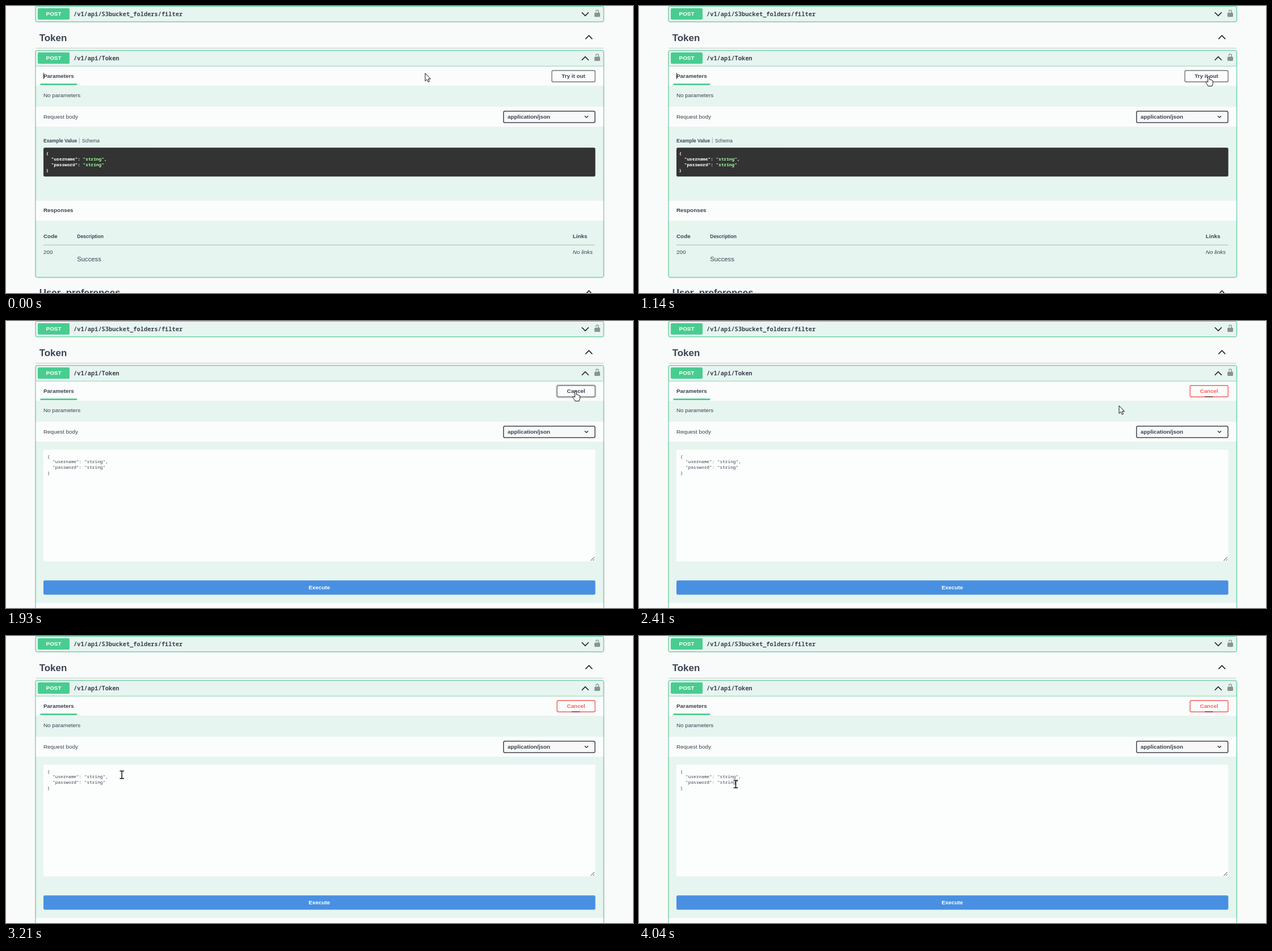
Recreate the animation shown at these times as an HTML page. Size 1105x507 px, loop 4100 ms.

```html
<!DOCTYPE html>
<html lang="en">
<head>
<meta charset="utf-8">
<title>API console</title>
<style>
html, body { margin: 0; height: 100%; overflow: hidden; background: #f9fbfa }
svg { display: block }
text { font: 9.87px "Liberation Sans", Arial, sans-serif; fill: #3b4151; white-space: pre }
.b { font-weight: 700 }
.m { text-anchor: middle }
.w { fill: #fff }
.h { font-size: 16.92px }
.s { font-size: 8.46px }
.path { font: 600 10.33px "Noto Sans Mono", monospace }
.code { font: 7.75px "Noto Sans Mono", monospace }
.dark text { font-weight: 700; fill: #fff }
.dark tspan { fill: #a2fca2 }
.post { fill: #49cc90 }
.box { fill: #e7f5f0; stroke: #49cc90; filter: drop-shadow(0 0 1px #0003) }
.bar { fill: #fbfdfc; filter: drop-shadow(0 .7px .7px #0002) }
.chev { fill: none; stroke: #222; stroke-width: 1.6 }
.btn { fill: #fbfdfc; stroke-width: 1.4 }
</style>
</head>
<body>
<svg width="1105" height="507" viewBox="0 0 1105 507">
  <defs>
    <g id="lock" fill="#8b9391">
      <rect x="-5" y="-1.5" width="10" height="7.6" rx="1.5"/>
      <path d="M-2.2-3V-3.5C-2.2-7 2.2-7 2.2-3.5V-1" fill="none" stroke="#8b9391" stroke-width="1.4"/>
    </g>
    <path id="up" class="chev" d="M-6 3.2L0-3L6 3.2"/>
  </defs>

  <rect class="box" x="52.2" y=".5" width="1001" height="27.3" rx="2.5"/>
  <rect class="post" x="56" y="4" width="56" height="20" rx="2"/>
  <text class="b m w" x="84" y="17.3">POST</text>
  <text class="path" x="119" y="18">/v1/api/S3bucket_folders/filter</text>
  <use href="#up" transform="translate(1020.8 14.4) scale(1 -1)"/>
  <use href="#lock" x="1042" y="13.2"/>

  <text class="b h" x="58.7" y="62.2">Token</text>
  <use href="#up" x="1027.3" y="55.2"/>
  <path d="M52 74.4H1053" stroke="#c3c9c9"/>

  <rect id="block" class="box" x="52.2" y="78.7" width="1001" rx="2.5"/>
  <rect class="post" x="56" y="82" width="56" height="20" rx="2"/>
  <text class="b m w" x="84" y="95.3">POST</text>
  <text class="path" x="119" y="96">/v1/api/Token</text>
  <use href="#up" x="1020.8" y="92.6"/>
  <use href="#lock" x="1042" y="91"/>

  <rect class="bar" x="52.7" y="106.5" width="1000" height="35"/>
  <path d="M52.7 106.2H1052.7" stroke="#8bdcb8"/>
  <rect class="post" x="60.5" y="137" width="64.8" height="2.8"/>
  <text class="b" x="66" y="127">Parameters</text>
  <path id="caret" d="M66.5 118V129" stroke="#222"/>
  <text x="66" y="161">No parameters</text>
  <rect class="bar" x="52.7" y="178" width="1000" height="35"/>
  <text x="66" y="198.6">Request body</text>
  <rect x="876.8" y="185.8" width="161.2" height="20.2" rx="2.6" fill="#f7f8f8" stroke="#41444e" stroke-width="1.5"/>
  <text class="b" x="884" y="198.6">application/json</text>
  <path class="chev" d="M1020 194.2L1023 197.2L1026 194.2" style="stroke-width:1.3"/>

  <g id="view">
    <text class="b s" x="66" y="240.5">Example Value</text>
    <path d="M129.3 232.5V242.5" stroke="#a5adab"/>
    <text class="s" x="134" y="240.5">Schema</text>
    <rect x="66" y="250.2" width="972.6" height="51" rx="2.8" fill="#333"/>
    <g class="dark">
      <text class="code" x="70.5" y="262.6">{</text>
      <text class="code" x="70.5" y="272.6">  "username": <tspan>"string"</tspan>,</text>
      <text class="code" x="70.5" y="282.6">  "password": <tspan>"string"</tspan></text>
      <text class="code" x="70.5" y="292.6">}</text>
    </g>
    <rect class="bar" x="52.7" y="344" width="1000" height="35"/>
    <text class="b" x="66" y="364.2">Responses</text>
    <text class="b" x="66" y="410">Code</text>
    <text class="b s" x="125.3" y="410">Description</text>
    <text class="b" x="998.8" y="410">Links</text>
    <path d="M66 422.2H1038" stroke="#a9b5b3"/>
    <text x="66" y="438.4">200</text>
    <text x="125.3" y="450.8" style="font-size:11.28px">Success</text>
    <text x="998.8" y="438.4" font-style="italic" style="font-style:italic">No links</text>
    <text class="b h" x="58.7" y="511.8">User_preferences</text>
    <use href="#up" x="1027.3" y="506"/>
  </g>

  <g id="edit">
    <rect x="66" y="227.3" width="972.6" height="197.5" rx="2.5" fill="#fcfefd"/>
    <text class="code" x="72.8" y="241.8">{</text>
    <text class="code" x="72.8" y="251.4">  "username": "string",</text>
    <text class="code" x="72.8" y="261.1">  "password": "string"</text>
    <text class="code" x="72.8" y="270.8">}</text>
    <path d="M1030.5 423.5L1037 417M1034.5 423.5L1037 421" stroke="#444"/>
    <rect x="66" y="458.2" width="972.6" height="25.3" rx="2.5" fill="#4990e2"/>
    <text class="b m w" x="552.2" y="474.2">Execute</text>
    <rect class="bar" x="52.7" y="498" width="1000" height="20"/>
  </g>

  <rect id="btn" class="btn" y="114" height="20" rx="2.5"/>
  <text id="label" class="b m" y="127"></text>
  <path id="smudge" d="M997 133.8H1011.5" stroke="#4d4a50" stroke-width="1.3"/>
  <path id="cursor" stroke-linejoin="round"/>
</svg>
<script>
const $ = id => document.getElementById(id);
const show = (id, on) => $(id).style.display = on ? '' : 'none';
const set = (id, attrs) => { for (const k in attrs) $(id).setAttribute(k, attrs[k]); };

// pointer moves: first step, last step, number of steps, end point, slowing down
const moves = [
  [70, 530, 8, 965, 123.7, 0],
  [600, 670, 2, 1002, 123.5, 0],
  [810, 810, 1, 1004, 123.7, 0],
  [2410, 2890, 8, 328, 232, 1],
  [2960, 3420, 8, 163, 249.5, 1],
  [3490, 3490, 1, 163, 250.6, 0],
  [3690, 4040, 6, 170.5, 261.6, 0]
];
const shapes = {
  arrow: 'M.5 .5V14.3L3.6 11.4L5.8 16L8 15L5.8 10.6H10Z',
  hand: 'M-1.4 11V1.5Q0-.7 1.4 1.5V6.5Q3 5.4 4 7Q5.5 6.3 6 7.9Q7.5 7.5 7.5 9.5V13Q7 15 6 17.7H-1.2Q-2.5 14.5-4.8 11.5Q-5.2 8.8-3.2 9.5Z',
  beam: 'M-3.8-6.7H-1L0-6L1-6.7H3.8M0-6V6M-3.8 6.7H-1L0 6L1 6.7H3.8'
};

function pointer(t) {
  let x = 738.3, y = 118.3;
  for (const [start, end, n, ex, ey, slow] of moves) {
    if (t < start) break;
    const step = end > start ? Math.floor((t - start) / (end - start) * (n - 1) + 1.001) : 1;
    let p = Math.min(1, step / n);
    if (slow) p = 1 - (1 - p) ** 2;
    x += (ex - x) * p;
    y += (ey - y) * p;
  }
  return [x, y];
}

const mix = (a, b, p) => `rgb(${a.map((v, i) => Math.round(v + (b[i] - v) * p))})`;

function draw(t) {
  const editing = t >= 1930;
  const red = Math.max(0, Math.min(1, (t - 1930) / 280));
  const left = editing ? 971.2 : 962;
  const focus = t >= 1620 && t < 2410;

  show('view', !editing);
  show('edit', editing);
  show('caret', t < 600 || t >= 1140 && t < 1620);
  show('smudge', t >= 2410);
  set('block', { height: editing ? 440 : 400.5 });

  set('btn', { x: left, width: 1038.2 - left, stroke: mix([118, 120, 124], [250, 96, 96], red) });
  $('btn').style.filter = focus ? 'drop-shadow(0 0 1.6px #0006)' : 'drop-shadow(0 .7px .7px #0002)';
  set('label', { x: (left + 1038.2) / 2 });
  $('label').textContent = editing ? 'Cancel' : 'Try it out';
  $('label').style.fill = mix([59, 65, 81], [250, 96, 96], red);

  const [x, y] = pointer(t);
  const kind = x > 970 && y < 135 ? 'hand' : y > 227 ? 'beam' : 'arrow';
  set('cursor', {
    d: shapes[kind],
    transform: `translate(${x} ${y})`,
    fill: kind === 'beam' ? 'none' : '#fff',
    stroke: '#111',
    'stroke-width': kind === 'beam' ? 1.5 : 1
  });
}

function tick() {
  draw(performance.now() % 4100);
  requestAnimationFrame(tick);
}
tick();
</script>
</body>
</html>
```
